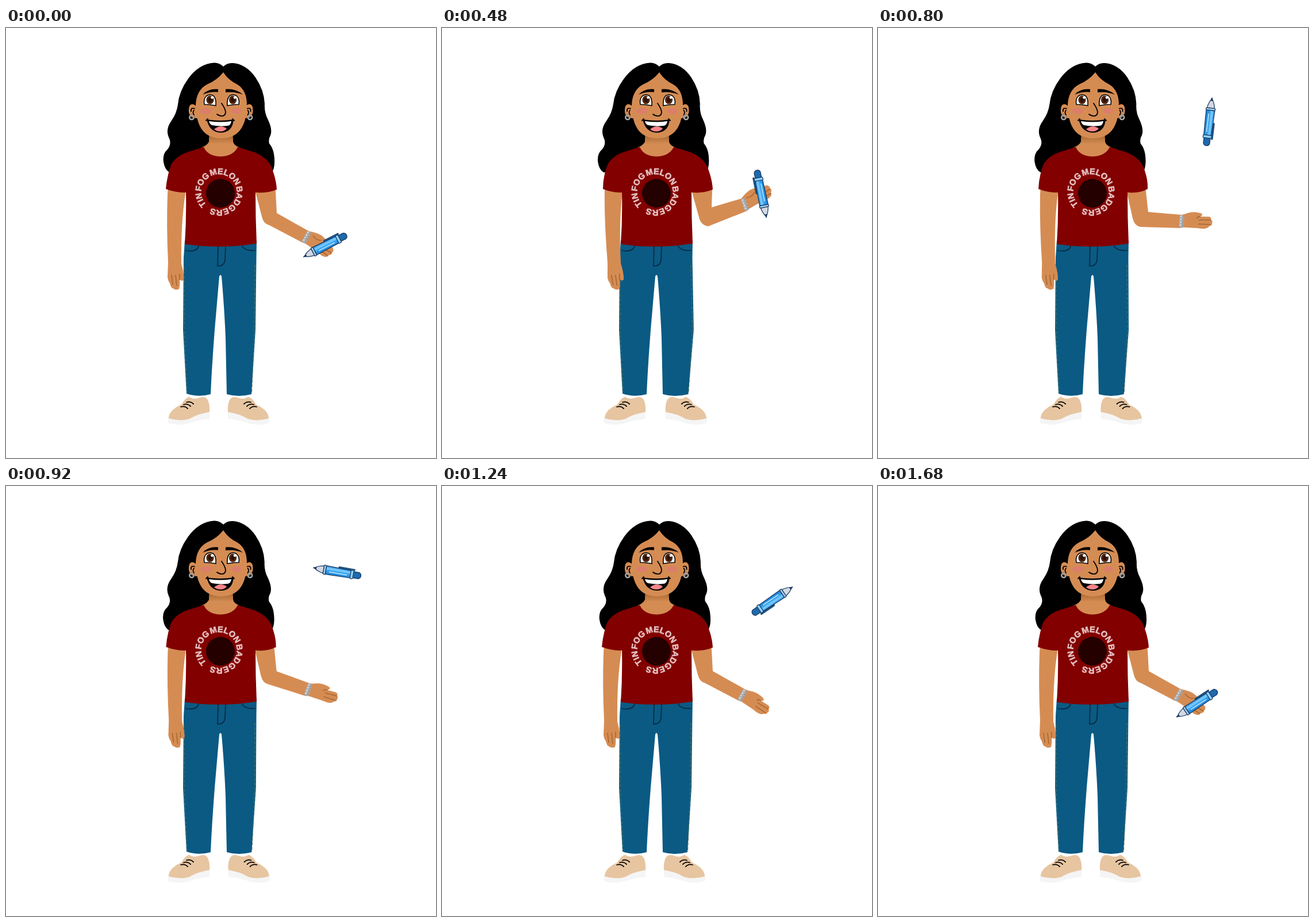
An HTML page for the animation above (1.8 s loop, 748 by 748 pixels).

```html
<!DOCTYPE html>
<html lang="en">
<head>
<meta charset="utf-8">
<title>Pen toss</title>
<style>
html, body { margin: 0; width: 100%; height: 100%; overflow: hidden; background: #fff; }
svg { display: block; width: 100vw; height: 100vh; }
.skin { fill: #d58c53; }
.line { fill: none; stroke: #000; stroke-width: 1.8; stroke-linecap: round; stroke-linejoin: round; }
.crease { fill: none; stroke: #a5652f; stroke-width: 1.5; stroke-linecap: round; }
.seam { fill: none; stroke: #0a2a40; stroke-width: 1.7; stroke-linecap: round; }
.stitch { fill: none; stroke: #56745c; stroke-width: 1.1; stroke-dasharray: 5 3; }
.ring {
  font: bold 14.5px "Liberation Sans", Arial, sans-serif; word-spacing: -2.5px;
  fill: #e5bfbf; stroke: #e5bfbf; stroke-width: .7;
}
</style>
</head>
<body>
<svg viewBox="0 0 748 748">
  <defs>
    <linearGradient id="barrel" x1="0" y1="0" x2="0" y2="1">
      <stop offset="0" stop-color="#1f7fd0"/>
      <stop offset=".45" stop-color="#36a3f0"/>
      <stop offset=".7" stop-color="#7fd0ff"/>
      <stop offset="1" stop-color="#2385d6"/>
    </linearGradient>
    <linearGradient id="chin" x1="0" y1="0" x2="0" y2="1">
      <stop offset="0" stop-color="#a5672f"/>
      <stop offset=".75" stop-color="#d58c53"/>
    </linearGradient>
    <path id="orbit" d="M348.6 307.1A31 31 0 1 1 348.7 307.2"/>
    <g id="shoe">
      <path fill="#f5f5f5" d="M283 676Q300 684 318 676Q335 666 354 665L354 680Q332 682 317 688Q300 692 284 688Q279 684 283 676Z"/>
      <path fill="#e7c5a1" d="M283 679Q283 665 305 655Q312 643 319 641.500Q326 647 337 643Q347 640 351 647Q355 655 354 668Q334 671 319 680Q302 685 283 679Z"/>
      <path class="line" d="M304 659Q311 657 316 662M309 655Q316 653 321 658M314 651Q321 649 326 654"/>
    </g>
    <path id="eye" fill="#fff" stroke="#000" stroke-width="1.6" d="M-10 8Q-12 -2 -6 -7Q0 -11 6 -7Q11 -2 10 10Q0 8 -10 8Z"/>
    <g id="iris">
      <ellipse rx="6.600" ry="7.400" fill="#52260f"/>
      <ellipse rx="3.400" ry="4" fill="#2a1006"/>
      <circle cx="3.500" cy="-4" r="2.300" fill="#fff"/>
    </g>
    <g id="ear">
      <path class="skin" stroke="#000" stroke-width="1.3" d="M332 136Q322 127 318 137Q315 152 325 157L334 158"/>
      <path class="line" d="M328 140Q321 138 322 145M327 143Q324 147 327 151"/>
      <circle cx="323" cy="155.500" r="3.700" fill="none" stroke="#555" stroke-width="3"/>
      <circle cx="323" cy="155.500" r="3.700" fill="none" stroke="#b9b9b9" stroke-width="1.800"/>
    </g>
  </defs>

  <path id="hair" d="M378 67Q371 60 362 60.500Q336 62 317 88Q301 110 299 133Q297 148 288 161Q277 176 283 190Q289 201 281 211Q272 219 274 233Q276 246 284 251L373 262L464 249Q469 238 466 219Q464 208 458 201Q456 193 460 187Q464 177 456 160Q449 147 450 132Q449 108 434 86Q418 63 395 61Q385 60 378 67Z"/>

  <path class="skin" d="M354 180L353 198Q350 204 340 208L373 240L406 208Q396 204 395 198L394 180Z"/>
  <path fill="url(#chin)" d="M354 186H394L395 198Q396 204 404 207H344Q352 204 353 198Z"/>

  <use href="#ear"/>
  <use href="#ear" transform="matrix(-1 0 0 1 747.5 0)"/>
  <path class="skin" d="M378 77Q367 91 350 98Q331 108 330 134Q331 192 374 192Q418 192 419 134Q419 108 402 98Q387 91 378 77Z"/>
  <g fill="#dd7c70" opacity=".85">
    <ellipse cx="347.500" cy="144.500" rx="10" ry="5"/>
    <ellipse cx="401" cy="144.500" rx="9" ry="5"/>
  </g>
  <path d="M342 116Q352 105 369 106.500L369 111.500Q354 110 342 116ZM382 106.500Q400 105 412 116Q398 110 382 112Z"/>
  <use href="#eye" x="355" y="125"/>
  <use href="#eye" transform="matrix(-1 0 0 1 395 125)"/>
  <use href="#iris" x="355" y="125"/>
  <use href="#iris" x="394.500" y="125"/>
  <path class="line" d="M375 131Q382 141 382 147Q381 154 374 153Q369 152 367 150"/>
  <path d="M349 159Q373 163 396 159Q394 182 373 182Q354 181 349 159Z"/>
  <path fill="#fff" d="M353 162Q373 165 392 162Q391 169 386 170Q373 172 358 169Q354 167 353 162Z"/>
  <path fill="#f9858a" d="M362 176Q373 167 384 175Q380 180 373 180Q366 180 362 176Z"/>
  <path class="line" d="M348 161L351 158M394 158L397 161"/>

  <path id="jeans" fill="#0a5a84"/>
  <path class="seam" d="M313 387Q333 391 336 377M410 377Q413 388 433 387M369 379L368 414Q379 415 381 404L382 379"/>
  <path class="stitch" d="M310 415L310 525L315 634"/>
  <path class="stitch" id="stitch"/>
  <use href="#shoe"/>
  <use href="#shoe" id="shoeR"/>

  <g id="armL">
    <path class="skin" d="M283 260L281 290Q279 345 282 408L281 434Q282 440 285 444Q287 453 291 453Q295 457 301 454Q303 447 302 437Q306 442 309 438Q310 428 305 410Q304 340 312 288V260Z"/>
    <path class="crease" d="M288 430L290 446M295 430L297 448M302 428V438"/>
  </g>

  <path class="skin" id="armR"/>
  <g id="hand">
    <g id="open">
      <path class="skin" d="M-2 -11L6 -13Q18 -18 28 -16Q36 -15 36 -12Q35 -10 32 -9L48 -9Q53 -7 51 -4Q55 -2 53 2Q54 6 49 7Q46 12 38 12L26 11L-2 10Z"/>
      <path class="crease" d="M32 -9Q28 -9 26 -6M30 -3L51 -3.500M30 4L50 4.500"/>
    </g>
    <g id="grip">
      <path class="skin" d="M-2 -11Q10 -16 21 -16Q34 -14 40 -9L49 -7Q54 -4 52 1Q54 5 49 8Q49 13 43 14Q36 15 30 12L-2 10Z"/>
      <path class="crease" d="M9 -8Q18 -4 25 -8M34 2L51 2M32 8L48 9"/>
    </g>
  </g>
  <g id="band">
    <rect x="-4" y="-11" width="8" height="22" rx="2" fill="#a9abad"/>
    <path d="M-1.500 -10V10" stroke="#d6d8da" stroke-width="2.500" stroke-dasharray="3 2"/>
    <path d="M2.500 -9V10" stroke="#7c7f82" stroke-width="1.200" stroke-dasharray="2 3"/>
  </g>

  <path id="shirt" fill="#820000"/>
  <circle cx="373" cy="287.500" r="25" fill="#240000"/>
  <text class="ring"><textPath href="#orbit">TIN FOG MELON BADGERS</textPath></text>

  <g id="pen" stroke="#12365f" stroke-width="1.200" stroke-linejoin="round">
    <path fill="#1f69ad" d="M-28 -5.500H-38Q-42 -4 -42 0Q-42 4 -38 5.500H-28Z"/>
    <path fill="url(#barrel)" d="M-24 -6.500L20 -7.500V7.500L-24 6.500Z"/>
    <rect x="-28.500" y="-7.500" width="5" height="15" rx="1.500" fill="#8fd0fa"/>
    <rect x="20" y="-8" width="4" height="16" rx="1.500" fill="#a9cdea"/>
    <path fill="#d3d8e2" d="M24 -6.500Q33 -5 38 -1.500V1.500Q33 5 24 6.500Z"/>
    <path fill="#1c3f77" d="M37 -1.500L42 0L37 1.500Z"/>
    <path fill="#2a7cc4" d="M-30 7.500V9.500H-3Q0 8.500 -3 7.500Z"/>
    <path stroke="#c4ecff" stroke-width="1.500" d="M-18 -2.500H14"/>
  </g>
</svg>
<script>
const LOOP = 1800, STEP = 40, LAST = 1680, SWING = 540;
const $ = id => document.getElementById(id);
const set = (id, name, value) => $(id).setAttribute(name, value);

// Arm points: armpit, elbow back, elbow under, wrist under, wrist top, elbow crook, outer arm, sleeve corner
const arm = [
  [434,286, 445,328, 458,343, 517,374, 528,354, 471,322, 469,284, 471,281],
  [433,286, 443,331, 456,346, 527,348, 529,325, 470,320, 466,284, 469,280],
  [435,286, 447,329, 463,345, 531,318, 523,296, 469,312, 470,284, 471,281]
];
const A = 0.529, B = 0.97;

// time, x, y, angle of the tip
const penTrack = [
  [0, 555, 379, 153], [280, 562, 346, 137.5], [480, 556, 288.5, 78.5],
  [560, 564, 241, 38], [800, 576, 163, -83], [940, 576, 149, -185],
  [1040, 575.5, 154, -259.4], [1240, 575, 199, -394], [1400, 569, 269, -475],
  [1560, 557, 370, -560], [1600, 554.5, 379, -573], [LAST, 554.5, 379, -573]
];
const handTrack = [
  [0, 30], [280, 13], [480, -34], [560, -38], [800, 1], [1040, 26], [1240, 32], [LAST, 30]
];

// Monotone cubic through the keys
function track(keys, t) {
  let i = 0;
  while (i < keys.length - 2 && t >= keys[i + 1][0]) i++;
  const h = keys[i + 1][0] - keys[i][0], u = (t - keys[i][0]) / h;
  const slope = (j, k) => (keys[j + 1][k] - keys[j][k]) / (keys[j + 1][0] - keys[j][0]);
  const tangent = (j, k) => {
    if (j === 0 || j === keys.length - 1) return 0;
    const a = slope(j - 1, k), b = slope(j, k);
    return a * b <= 0 ? 0 : 2 * a * b / (a + b);
  };
  return keys[i].slice(1).map((v, n) => {
    const k = n + 1, w = keys[i + 1][k];
    return v + (w - v) * u * u * (3 - 2 * u)
      + h * u * (1 - u) * ((1 - u) * tangent(i, k) - u * tangent(i + 1, k));
  });
}

// Quadratic blend of the three arm poses
function bend(p) {
  const w = [
    (p - A) * (p - B) / (A * B),
    p * (p - B) / (A * (A - B)),
    p * (p - A) / (B * (B - A))
  ];
  return arm[0].map((_, i) => w[0] * arm[0][i] + w[1] * arm[1][i] + w[2] * arm[2][i]);
}

function draw(t) {
  const p = t < 2 * SWING ? (1 - Math.cos(Math.PI * t / SWING)) / 2 : 0;
  const [ax, ay, bx, by, cx, cy, dx, dy, ex, ey, fx, fy, gx, gy, sx, sy] = bend(p);
  const wx = (dx + ex) / 2, wy = (dy + ey) / 2;
  const wrist = Math.atan2(dy - ey, dx - ex) * 180 / Math.PI - 90;
  const place = (x, y, a) => `translate(${x} ${y}) rotate(${a})`;

  set('armR', 'd', `M${ax} 255L${ax} ${ay}L${bx} ${by}Q${bx + 3} ${cy - 2} ${cx} ${cy}
    L${dx} ${dy}L${ex} ${ey}L${fx} ${fy}L${gx} ${gy}L${gx - 6} 255Z`);
  set('band', 'transform', place(wx, wy, wrist));
  set('hand', 'transform', place(wx, wy, track(handTrack, t)[0]));
  const held = t < 560 || t >= 1560;
  set('grip', 'visibility', held ? 'visible' : 'hidden');
  set('open', 'visibility', held ? 'hidden' : 'visible');

  const lx = 278 + 2 * p;
  set('shirt', 'd', `M344 207C352 229 394 229 403 207L422 213Q450 220 461 240Q470 262 ${sx} ${sy}
    Q455 288 434 286Q434 330 436 375Q373 385 311 376Q314 330 313 286
    Q297 287 ${lx} 280Q280 258 ${287 + p} 238Q297 220 325 213Z`);

  const knee = 434 + 4 * p, cuff = 427 + 1.5 * p;
  set('jeans', 'd', `M311 370L309 400L308 525L314 636Q335 643 356 637Q358 590 363 525L371 432
    Q373 427 375 432Q380 490 382 540L384 637Q405 643 ${cuff} 637L${knee} 525L435.500 400L436 370Z`);
  set('stitch', 'd', `M433 412L${knee - 2} 525L${cuff + 0.5} 634`);
  set('shoeR', 'transform', `matrix(-1 0 0 1 ${740 + 3 * p} 0)`);
  set('armL', 'transform', `rotate(${-2.1 * p} 296 240)`);
  set('hair', 'transform', `translate(0 60) skewX(${-0.95 * p}) translate(0 -60)`);

  set('pen', 'transform', place(...track(penTrack, t)));
}

function tick() {
  const t = performance.now() % LOOP;
  draw(Math.min(LAST, Math.floor(t / STEP) * STEP));
  requestAnimationFrame(tick);
}
tick();
</script>
</body>
</html>
```
